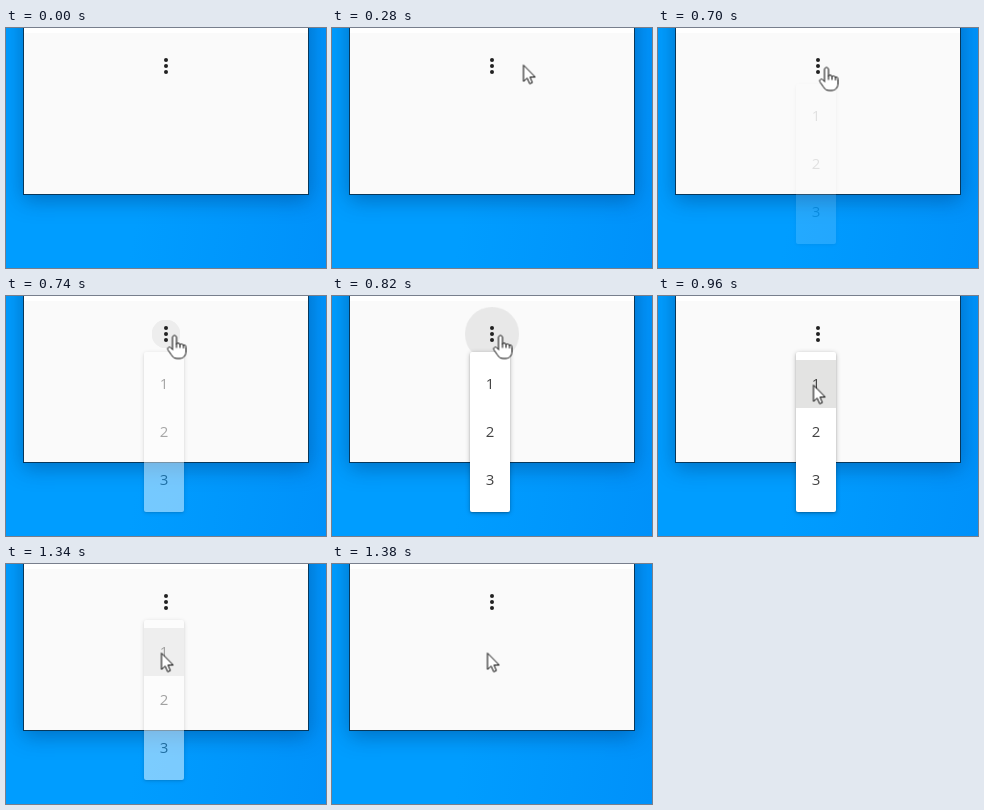
These frames come from a looping animation (320 by 240 pixels, 1.58 s). An HTML page:

```html
<!DOCTYPE html>
<html lang="en">
<head>
<meta charset="utf-8">
<title>Menu</title>
<style>
  html, body { margin: 0; width: 100%; height: 100%; overflow: hidden; }
  body { position: relative; background: linear-gradient(100deg, #009dff 0%, #009dff 45%, #0091fa 100%); }
  body * { position: absolute; box-sizing: border-box; }

  .window {
    left: 17px; top: -40px; width: 286px; height: 207px;
    border: 1px solid #07385c;
    background: linear-gradient(#fff 44px, #fafafa 44px);
    box-shadow: 0 5px 20px rgba(0, 30, 80, .36);
  }

  .ripple, .menu, .hover, .cursor, .arrow, .hand {
    animation: 1580ms linear infinite;
  }
  .ripple {
    left: 127px; top: 5px; width: 66px; height: 66px;
    border-radius: 50%; background: #e8e8e8;
    animation-name: ripple;
  }
  .dots i {
    left: 158px; width: 4px; height: 4px;
    border-radius: 50%; background: #212121;
  }
  .dots i:nth-child(1) { top: 30px; }
  .dots i:nth-child(2) { top: 36px; }
  .dots i:nth-child(3) { top: 42px; }

  .menu {
    left: 138px; top: 56px; width: 40px; height: 160px;
    border-radius: 2px; background: #fff;
    box-shadow: 0 1px 2px rgba(0, 0, 0, .22), 0 1px 5px rgba(0, 0, 0, .24);
    font: 15px/48px "Open Sans", "Noto Sans", sans-serif;
    color: #444; text-align: center;
    animation-name: menu;
  }
  .menu span { left: 0; width: 40px; height: 48px; }
  .menu span:nth-of-type(1) { top: 7px; }
  .menu span:nth-of-type(2) { top: 55px; }
  .menu span:nth-of-type(3) { top: 103px; }
  .hover {
    left: 0; top: 8px; width: 40px; height: 48px;
    background: #e3e3e2;
    animation-name: hover; animation-timing-function: step-end;
  }

  .cursor { left: 0; top: 0; width: 1px; height: 1px; overflow: visible; animation-name: move; }
  .cursor path { fill: #fff; stroke: #000; stroke-linejoin: round; stroke-linecap: round; }
  .cursor .line { fill: none; }
  .arrow, .hand { animation-timing-function: step-end; }
  .arrow { animation-name: arrow; }
  .hand { animation-name: hand; }

  @keyframes move {
    0%, 11.38% { transform: translate(-60px, 0); }
    11.39% { transform: translate(278px, 59px); animation-timing-function: cubic-bezier(.3, .3, .7, 1); }
    17.7%, 20.24% { transform: translate(191.5px, 37.5px); }
    20.25% { transform: translate(187px, 37.7px); animation-timing-function: ease-out; }
    25.3%, 52.85% { transform: translate(168.5px, 39.5px); animation-timing-function: ease-in-out; }
    60.4%, 100% { transform: translate(155.5px, 89.5px); }
  }
  @keyframes arrow {
    0% { opacity: 1; }
    22.15% { opacity: 0; }
    56%, 100% { opacity: 1; }
  }
  @keyframes hand {
    0% { opacity: 0; }
    22.15% { opacity: 1; }
    56%, 100% { opacity: 0; }
  }
  @keyframes ripple {
    0%, 45.5% { transform: scale(.15); opacity: 0; }
    45.57% { transform: scale(.25); opacity: .6; animation-timing-function: ease-out; }
    51.8% { transform: scale(.82); opacity: 1; }
    53.1% { transform: scale(.84); opacity: 1; }
    57% { transform: scale(1); opacity: .5; }
    60.4%, 100% { transform: scale(1); opacity: 0; }
  }
  @keyframes menu {
    0%, 44.28% { opacity: 0; }
    44.3%, 45.5% { opacity: .14; animation-timing-function: ease-out; }
    51.2%, 81% { opacity: 1; }
    83.53% { opacity: .98; }
    83.54% { opacity: .75; }
    87.3%, 100% { opacity: 0; }
  }
  @keyframes hover {
    0% { opacity: 0; }
    56.65% { opacity: 1; }
    90%, 100% { opacity: 0; }
  }
</style>
</head>
<body>
  <div class="window"></div>
  <div class="ripple"></div>
  <div class="dots"><i></i><i></i><i></i></div>
  <div class="menu">
    <div class="hover"></div>
    <span>1</span><span>2</span><span>3</span>
  </div>
  <svg class="cursor">
    <path class="arrow" d="M0 0V16L3.7 12.6 6.2 18.3 8.9 17.1 6.5 11.6H11.4Z"/>
    <g class="hand">
      <path d="M-2 13V2C-2-.7 2-.7 2 2V8.5C2.5 7 5.5 7.3 5.5 9.3C6 8 9 8.3 9 10.2C9.5 9 11.5 9.3 11.5 11.5V16C11.5 20 9 23 5 23H3C0 23-1.5 22-3 19.5L-6.5 14.5C-7.8 12.3-5.2 10.6-3.6 12.3L-2 14Z"/>
      <path class="line" d="M2 8.5V12M5.5 9.3V12M9 10.2V12.5"/>
    </g>
  </svg>
</body>
</html>
```
